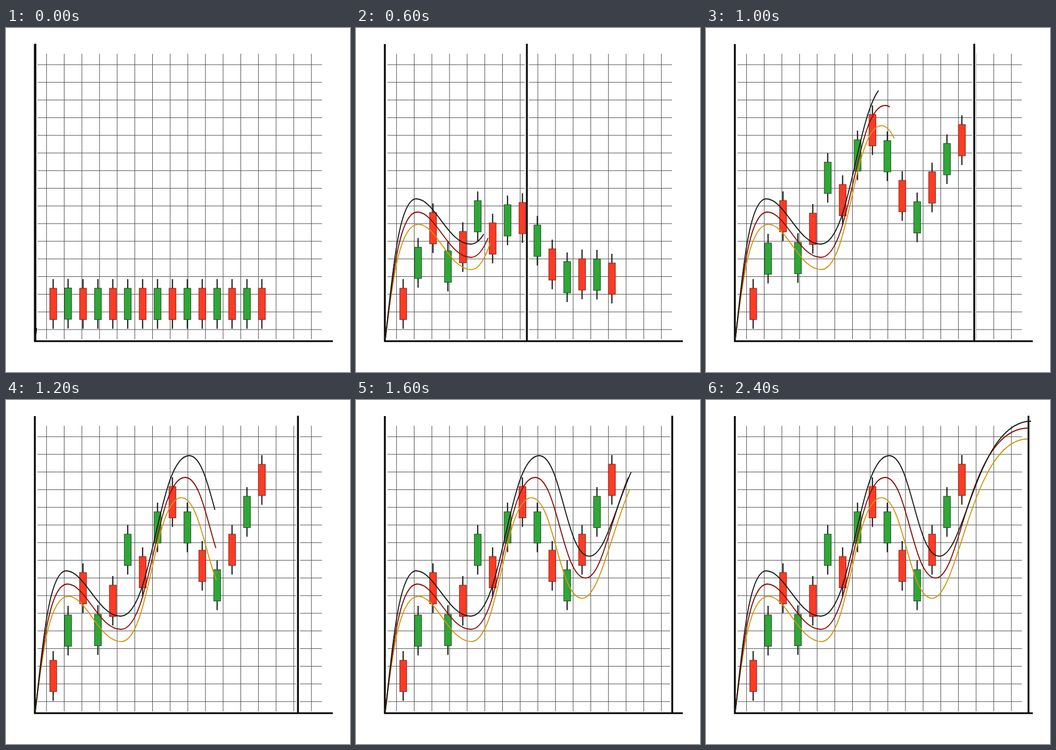
Animation, 600 px wide and 600 px high, one loop 2.5 s. Source, as an HTML page:

```html
<!DOCTYPE html>
<html lang="en">
<head>
<meta charset="utf-8">
<title>Candlestick chart</title>
<style>
  html, body { margin: 0; width: 100%; height: 100%; overflow: hidden; background: #fff; }
  svg { display: block; width: 100%; height: 100%; }
</style>
</head>
<body>
<svg id="stage" viewBox="0 0 600 600"></svg>
<script>
const LOOP = 2500, STEP = 100;
const stage = document.getElementById('stage');

function add(tag, attrs, parent = stage) {
  const el = document.createElementNS('http://www.w3.org/2000/svg', tag);
  for (const key in attrs) el.setAttribute(key, attrs[key]);
  return parent.appendChild(el);
}
const line = (d, stroke, width, parent) =>
  add('path', { d, stroke, 'stroke-width': width, fill: 'none' }, parent);

// Grid and axes
let grid = '';
for (let k = 0; k < 16; k++) {
  const offset = 30.8 * k;
  grid += `M${70.7 + offset} 45V543M55 ${64 + offset}H551`;
}
line(grid, '#555', 1);
const halo = line('M0 27V543', '#fff', 7);
line('M50.3 28V547', '#080808', 3.2);
line('M49 546.2H570', '#080808', 3);

// Candles rise one after another from the base row to their own price level
const BASE = 454;
const levels = [454, 375, 301, 374, 323, 234, 273, 195, 151, 195, 262, 296, 234, 168, 112];
const candles = levels.map((_, i) => {
  const g = add('g');
  const red = i % 2 === 0;
  line('M0 -16V70.5', '#111', 2, g);
  add('rect', {
    x: -6, y: 0, width: 12, height: 54.5,
    fill: red ? '#fd3b25' : '#30a638',
    stroke: red ? '#7d2519' : '#174f20', 'stroke-width': 1
  }, g);
  return g;
});

const bar = line('M0 27.5V546', '#080808', 3.2);

// Crests and troughs of the top curve; dx, dy is how far each one moves per lane.
// Handles are fractions of the horizontal run before and after a level tangent.
const turns = [
  { x: 105, y: 298, dx: 2, dy: 23, handles: [0.2, 0.61] },
  { x: 200, y: 377, dx: 0.5, dy: 23, handles: [0.345, 0.42] },
  { x: 319.5, y: 97, dx: -7, dy: 38, handles: [0.475, 0.46] },
  { x: 407, y: 272.5, dx: -6.5, dy: 38, handles: [0.445, 0.465] }
];

function curvePath(lane, end, sweep) {
  let x0 = 51, y0 = 543, leaveY = 455, d = `M${x0} ${y0}`;
  const points = turns.map(p => ({ ...p, x: p.x + p.dx * lane, y: p.y + p.dy * lane }));
  points.push({ x: end[0], y: end[1], handles: [0.28, sweep] });
  for (const { x, y, handles: [out, into] } of points) {
    const run = x - x0;
    d += `C${x0 + out * run} ${leaveY} ${x - into * run} ${y} ${x} ${y}`;
    x0 = x;
    leaveY = y;
  }
  return d;
}

const curves = [
  { color: '#d0960f', lane: 1.93, end: [561, 68], sweep: 0.59 },
  { color: '#86100b', lane: 1, end: [562, 49], sweep: 0.655 },
  { color: '#161e17', lane: 0, end: [567, 37], sweep: 0.595 }
].map(({ color, lane, end, sweep }) => {
  const path = line(curvePath(lane, end, sweep), color, 1.8);
  path.setAttribute('pathLength', 1);
  return path;
});

const clamp = v => Math.min(1, Math.max(0, v));
const easeSine = u => (1 - Math.cos(Math.PI * clamp(u))) / 2;

// Cubic Bézier easing with control points (a, 0) and (b, 1)
function easeBezier(u, a, b) {
  if (u >= 1) return 1;
  let lo = 0, hi = 1;
  for (let n = 0; n < 24; n++) {
    const s = (lo + hi) / 2, r = 1 - s;
    if (3 * r * r * s * a + 3 * r * s * s * b + s * s * s < u) lo = s; else hi = s;
  }
  return lo * lo * (3 - 2 * lo);
}

function render(t) {
  const x = 51.3 + 511.2 * easeBezier(t / 2000, 0.34, 0.145);
  halo.setAttribute('transform', `translate(${x})`);
  bar.setAttribute('transform', `translate(${x})`);

  candles.forEach((g, i) => {
    const rise = easeSine((t + 77 - 35 * i) / 800);
    const y = BASE + (levels[i] - BASE) * rise;
    g.setAttribute('transform', `translate(${82.3 + 26 * i} ${y})`);
  });

  const drawn = clamp((t + 30) / 1830);
  for (const path of curves) path.setAttribute('stroke-dasharray', `${drawn} 2`);
}

const start = performance.now();
function tick() {
  const t = (performance.now() - start) % LOOP;
  render(Math.floor(t / STEP) * STEP);
  requestAnimationFrame(tick);
}
render(0);
requestAnimationFrame(tick);
</script>
</body>
</html>
```
